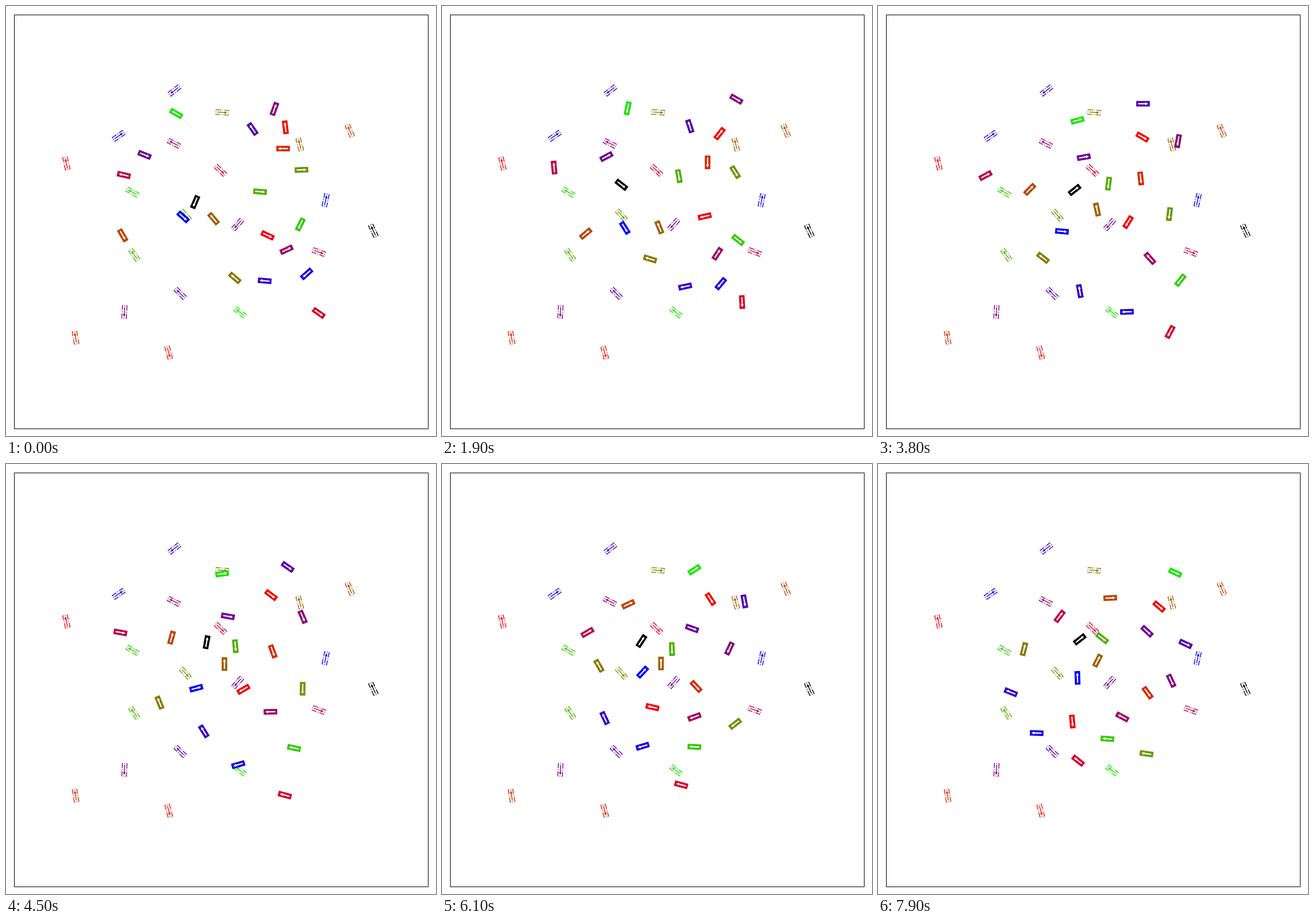
Animation of 748x748 px, one loop 8 s. Source, as a matplotlib script:

```python
import numpy as np
import matplotlib.pyplot as plt
from matplotlib.animation import FuncAnimation
from matplotlib.patches import Polygon, Rectangle

SIZE, DPI = 748, 100
PX = 72 / DPI
STEPS = (0, 18, 26, 37, 44, 60, 78)
BOX = np.array([(-11, -4), (11, -4), (11, 4), (-11, 4)])


def arrow_shape(shaft, head):
    return np.array([(-8.5, -shaft), (4, -shaft), (4, -head), (9, 0),
                     (4, head), (4, shaft), (-8.5, shaft)])


GOAL_ARROW = arrow_shape(0.7, 2.3)
CAR_ARROW = arrow_shape(1.1, 2.6)

fig = plt.figure(figsize=(SIZE / DPI, SIZE / DPI), dpi=DPI, facecolor="white")
ax = fig.add_axes([0, 0, 1, 1])
ax.set(xlim=(0, SIZE), ylim=(SIZE, 0))
ax.axis("off")
ax.add_patch(Rectangle((14.5, 14.5), 720, 720, fill=False, lw=PX))


def color(i):
    return "black" if i == 19 else plt.cm.brg(i / 19)


def heading(deg):
    rad = np.radians(deg)
    return np.stack([np.cos(rad), -np.sin(rad)], axis=-1)


def place(shape, x, y, deg):
    c, s = heading(deg)
    return shape @ np.array([(c, s), (-s, c)]) + (x, y)


def drive(poses):
    """Turn steadily between poses and move along the heading, either way."""
    rows = [np.array([poses[0]], float)]
    for k0, k1, a, b in zip(STEPS, STEPS[1:], poses, poses[1:]):
        n = k1 - k0
        a, b = np.array(a, float), np.array(b, float)
        turn = np.linspace(a[2], b[2], n + 1)
        arc = np.cumsum(heading((turn[1:] + turn[:-1]) / 2), axis=0)
        chord = b[:2] - a[:2]
        speed = chord @ arc[-1] / (arc[-1] @ arc[-1])
        drift = (chord - speed * arc[-1]) * np.linspace(0, 1, n + 1)[1:, None]
        rows.append(np.column_stack([a[:2] + speed * arc + drift, turn[1:]]))
    return np.vstack(rows)


cars = []


def add_car(i, goal, *poses):
    c = color(i)
    ax.add_patch(Polygon(place(BOX, *goal), fill=False, ec=c, lw=1,
                         ls="-.", zorder=2))
    ax.add_patch(Polygon(place(GOAL_ARROW, *goal), fc=c, lw=0, zorder=2))
    track = drive(poses)
    body = Polygon(place(BOX, *track[0]), fc=c, ec=c, lw=1.2,
                   joinstyle="miter", zorder=3 + i / 100)
    arrow = Polygon(place(CAR_ARROW, *track[0]), fc="white", lw=0,
                    zorder=3.005 + i / 100)
    ax.add_patch(body)
    ax.add_patch(arrow)
    cars.append((body, arrow, track))


# Goal pose, then the poses to pass: x, y, angle
add_car(0, (556, 338, 78), (308, 367, -42), (318, 386, -58), (325, 393, -25),
        (320, 392, -5), (331, 390, 15), (349, 362, 47), (347, 372, 92))
add_car(1, (196, 226, 35), (523, 466, 222), (485, 483, 230), (468, 500, 222),
        (433, 532, 182), (404, 523, 196), (349, 491, 197), (276, 468, 178))
add_car(2, (293, 147, 218), (450, 478, 175), (423, 488, 192), (391, 498, 220),
        (351, 496, 100), (344, 465, 122), (283, 442, 115), (231, 397, 158))
add_car(3, (303, 500, 135), (429, 214, 125), (431, 209, 108), (427, 195, 83),
        (461, 170, 0), (490, 179, -35), (526, 239, -80), (535, 313, -25))
add_car(4, (403, 380, 228), (241, 259, -22), (286, 262, 28), (320, 254, -12),
        (358, 263, 10), (386, 265, -10), (435, 286, -20), (468, 291, -43))
add_car(5, (206, 532, 267), (467, 179, 70), (512, 162, -30), (531, 190, -110),
        (522, 235, -100), (516, 266, -67), (500, 321, -115), (510, 377, -65))
add_car(6, (292, 239, 153), (488, 424, 25), (479, 431, 57), (475, 441, 93),
        (473, 439, 132), (460, 431, 181), (439, 440, 200), (425, 440, 152))
add_car(7, (544, 428, -20), (205, 294, 167), (195, 281, 95), (195, 284, 78),
        (187, 295, 28), (199, 293, -10), (253, 293, 30), (316, 265, 53))
add_car(8, (373, 286, -43), (544, 534, -35), (522, 515, -87),
        (520, 525, -102), (508, 567, -118), (485, 576, -195),
        (416, 558, -195), (348, 516, -218))
add_car(9, (105, 274, 103), (455, 399, -25), (457, 366, 193), (457, 366, 175),
        (435, 376, 238), (413, 392, 210), (366, 423, 167), (338, 448, 275))
add_car(10, (283, 603, -75), (486, 211, 97), (483, 222, 52), (468, 230, -3),
        (460, 228, -30), (461, 228, -37), (467, 235, -57), (489, 248, -40))
add_car(11, (121, 577, 100), (482, 248, 180), (462, 272, 270),
        (459, 284, 240), (457, 300, 276), (464, 326, 290), (442, 387, 313),
        (469, 398, 306))
add_car(12, (598, 217, 113), (203, 399, -60), (250, 396, 40), (265, 364, 67),
        (264, 319, 45), (288, 302, 75), (324, 244, 25), (404, 233, 3))
add_car(13, (511, 241, 105), (361, 370, 130), (378, 385, 112), (378, 382, 90),
        (381, 354, 102), (380, 348, 90), (381, 347, 90), (382, 342, 63))
add_car(14, (376, 185, -4), (398, 473, 140), (362, 440, 163), (334, 444, 187),
        (287, 438, 142), (267, 415, 112), (273, 351, 120), (254, 322, 76))
add_car(15, (312, 364, -48), (514, 285, 2), (510, 289, -58), (509, 316, -115),
        (507, 362, -97), (516, 391, -91), (510, 452, -142), (467, 504, -188))
add_car(16, (223, 433, 125), (442, 323, -5), (412, 296, -80),
        (412, 290, -103), (401, 309, -97), (399, 317, -85), (400, 322, -88),
        (390, 303, -38))
add_car(17, (220, 324, 150), (512, 380, 243), (515, 407, 322),
        (536, 430, 286), (526, 477, 232), (501, 494, 168), (439, 492, 177),
        (399, 478, 176))
add_car(18, (407, 533, 142), (296, 187, 150), (323, 178, 258),
        (323, 187, 290), (347, 199, 375), (376, 191, 368), (439, 184, 393),
        (517, 189, 335))
add_car(19, (639, 391, 115), (329, 341, 247), (312, 311, 322),
        (315, 315, 312), (342, 320, 398), (349, 310, 440), (347, 308, 417),
        (351, 305, 398))


def update(frame):
    step = max(0, frame - 1)
    for body, arrow, track in cars:
        body.set_xy(place(BOX, *track[step]))
        arrow.set_xy(place(CAR_ARROW, *track[step]))
    return []


anim = FuncAnimation(fig, update, frames=80, interval=100, repeat=True,
                     repeat_delay=0, init_func=lambda: update(0))
plt.show()
```
